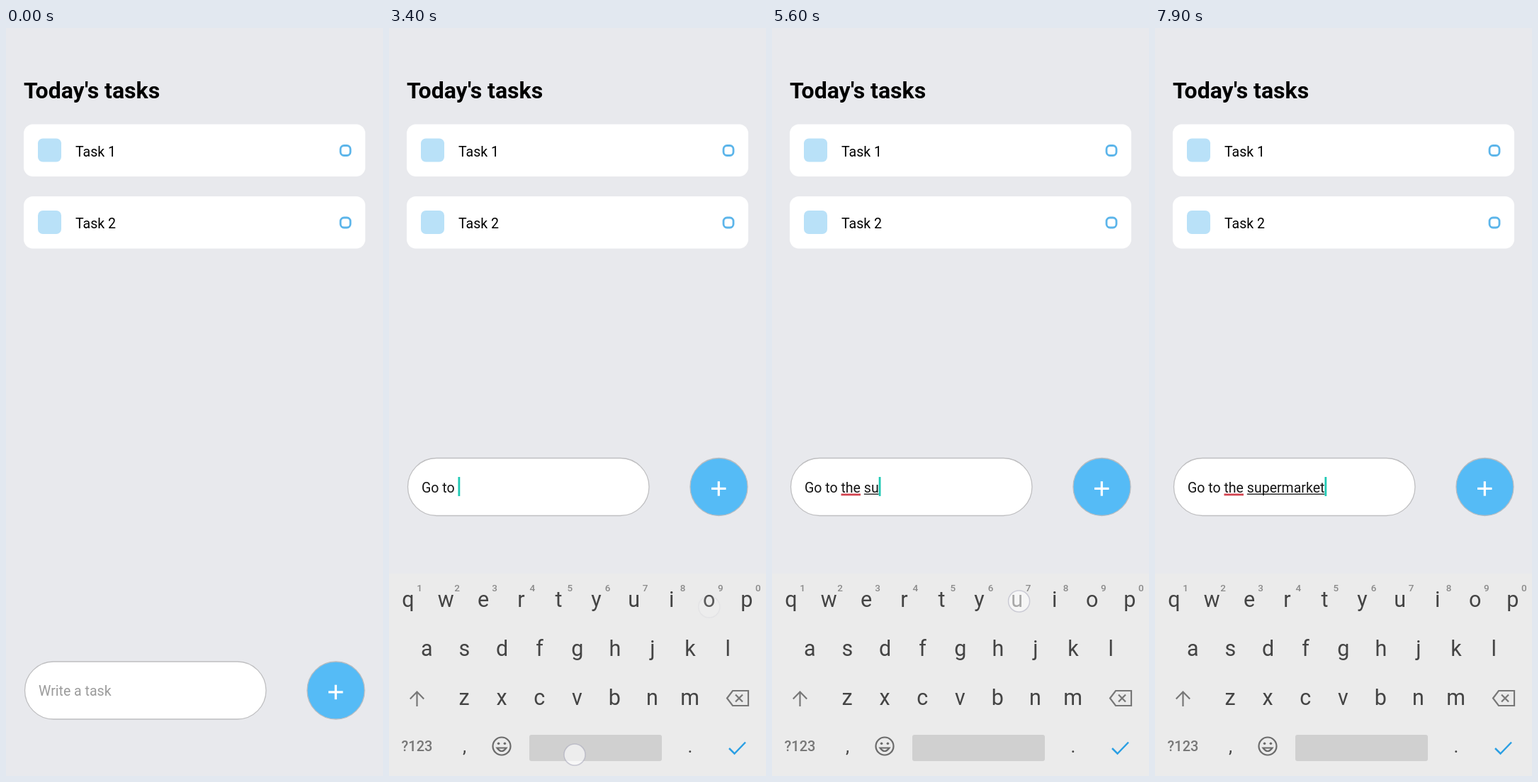
Recreate the animation shown at these times as an HTML page with a canvas. Size 532 by 1053 pixels, loop 8 s.

```html
<!DOCTYPE html>
<html lang="en">
<head>
<meta charset="utf-8">
<title>Today's tasks</title>
<style>
  html, body { margin: 0; width: 100%; height: 100%; overflow: hidden; background: #e8e9ed; }
  canvas { display: block; }
</style>
</head>
<body>
<canvas id="stage" width="532" height="1053"></canvas>
<script>
const ctx = document.getElementById('stage').getContext('2d');
const LOOP = 8000, FOCUS = 1300, HOLD = 100, FADE = 280;
const BLUE = '#55bbf6', ROWS = ['qwertyuiop', 'asdfghjkl', 'zxcvbnm'];
const TEXT_SIZE = 19.55, TEXT_X = 46;

// Key, press time, finger offset from the key's anchor
const taps = [
  ['G', 2200, -7, 9], ['o', 2410, 8, -5], [' ', 2620, -38, 13],
  ['t', 2880], ['o', 3070], [' ', 3260, -30, 13],
  ['t', 4350, -3, 26], ['h', 4560], ['e', 4750], [' ', 4950, -30, 5],
  ['s', 5180], ['u', 5430, 3, 2],
  ['p', 5820], ['e', 6060], ['r', 6300], ['m', 6560, 5, 16],
  ['a', 6800], ['r', 6980], ['k', 7140], ['e', 7300], ['t', 7460]
].map(([char, time, dx = 0, dy = 10]) => ({ char, time, dx, dy }));

function keyAt(char) {
  if (char === ' ') return { x: 292, base: 1020, row: 3 };
  const row = ROWS.findIndex(r => r.includes(char.toLowerCase()));
  const col = ROWS[row].indexOf(char.toLowerCase());
  return { x: [27, 53.3, 106][row] + col * 53.1, base: [815, 884, 953][row], row };
}

function text(str, x, y, size, color, weight = 400, align = 'left') {
  ctx.font = `${weight} ${size}px Roboto, sans-serif`;
  ctx.fillStyle = color;
  ctx.textAlign = align;
  ctx.fillText(str, x, y);
}

function widthOf(str) {
  ctx.font = `400 ${TEXT_SIZE}px Roboto, sans-serif`;
  return ctx.measureText(str).width;
}

function rect(x, y, w, h, color) {
  ctx.fillStyle = color;
  ctx.fillRect(x, y, w, h);
}

function rounded(x, y, w, h, r, fill, stroke, line = 1.3) {
  ctx.beginPath();
  ctx.roundRect(x, y, w, h, r);
  if (fill) { ctx.fillStyle = fill; ctx.fill(); }
  if (stroke) { ctx.strokeStyle = stroke; ctx.lineWidth = line; ctx.stroke(); }
}

function icon(path, color, line = 2.2) {
  ctx.strokeStyle = color;
  ctx.lineWidth = line;
  ctx.stroke(new Path2D(path));
}

function drawTasks() {
  text("Today's tasks", 25, 99, 32, '#000', 700);
  [135.5, 237].forEach((y, i) => {
    rounded(25, y, 482, 73.5, 13, '#fff');
    rounded(45, y + 20, 33, 33, 7, '#b9e1f8');
    text(`Task ${i + 1}`, 98, y + 45.3, TEXT_SIZE, '#000');
    rounded(472, y + 30, 14, 14, 5, null, '#5cb5ea', 2.8);
  });
}

function drawInput(t, typed, lastEdit) {
  const focused = t >= FOCUS, y = focused ? 605.5 : 892;
  rounded(26.5, y, 340.5, 81, 40.5, '#fff', '#bfbfc1');
  rounded(425, y, 81, 81, 40.5, BLUE, '#b5bcc2');
  rect(455, y + 41.3, 20.5, 3.2, '#fff');
  rect(463.7, y + 32.7, 3.2, 20.5, '#fff');

  text(typed || 'Write a task', TEXT_X, y + 48, TEXT_SIZE, typed ? '#151515' : '#9b9b9b');
  if (!focused) return;

  const wordStart = typed.lastIndexOf(' ') + 1;
  const underline = (from, to, color, line) => {
    const x = TEXT_X + widthOf(typed.slice(0, from));
    rect(x, y + 50, widthOf(typed.slice(from, to)), line, color);
  };
  if (wordStart < typed.length) underline(wordStart, typed.length, '#222', 1.4);
  if (typed.startsWith('Go to the ')) underline(6, 9, '#d2434f', 2.8);
  if ((t - lastEdit) % 1000 < 500) rect(TEXT_X + widthOf(typed), y + 26.5, 2.8, 27, '#1fc9b4');
}

function drawKeyboard(t, upper) {
  const left = Math.max(0, 1 - (t - FOCUS) / 370);
  rect(0, 768, 532, 285, '#fff');
  ctx.save();
  ctx.translate(0, 284 * left ** 3);
  rect(0, 768, 532, 285, '#ebebeb');
  ROWS.forEach((row, r) => [...row].forEach((char, i) => {
    const { x, base } = keyAt(char);
    text(upper ? char.toUpperCase() : char, x, base, 30.5, '#444', 400, 'center');
    if (r === 0) text((i + 1) % 10, x + 16, 793, 13.5, '#8a8a8a', 500, 'center');
  }));
  icon('M39.5 955V934.5M29.8 944.5L39.5 934.5L49.2 944.5', upper ? '#2b9fe3' : '#777');
  icon('M477 943.5L485 933H507V954H485ZM489 938.5L499 948.5M499 938.5L489 948.5', '#777');
  text('?123', 39.5, 1018, 20, '#777', 500, 'center');
  text(',', 106.5, 1020, 26, '#444', 400, 'center');
  text('.', 425, 1020, 26, '#444', 400, 'center');
  icon('M171.5 1011a12.5 12.5 0 1 0-25 0a12.5 12.5 0 1 0 25 0M152.5 1013.5q6.5 9 13 0z', '#6b6b6b');
  rounded(152.8, 1005.5, 3.6, 3.6, 1.8, '#6b6b6b');
  rounded(161.6, 1005.5, 3.6, 3.6, 1.8, '#6b6b6b');
  rounded(198, 995, 187, 37, 3, '#d0d0d0');
  icon('M480 1014L487.5 1021.5L503 1005.5', '#2b9fe3', 2.5);
  ctx.restore();
}

function drawPopup(char) {
  const { x, base, row } = keyAt(char);
  if (row === 3) return;
  ctx.save();
  ctx.shadowColor = 'rgba(0,0,0,.28)';
  ctx.shadowBlur = 7;
  ctx.shadowOffsetY = 2;
  rounded(x - 26, base - 134, 52, 153, 3, '#fff');
  ctx.restore();
  text(char, x, base - 82, 37, '#3c3c3c', 400, 'center');
  if (row === 0) [8, 12.5, 17].forEach(dx => rect(x + dx - 0.8, base - 67.5, 2.3, 2.3, '#555'));
}

function drawTouch(x, y, age) {
  if (age < 0 || age > HOLD + FADE) return;
  ctx.globalAlpha = Math.min(1, 1 - (age - HOLD) / FADE);
  rounded(x - 15, y - 15, 30, 30, 15, 'rgba(255,255,255,.72)', 'rgba(165,165,185,.65)', 1.5);
  ctx.globalAlpha = 1;
}

function frame(now) {
  const t = now % LOOP;
  const done = taps.filter(tap => t >= tap.time + HOLD);
  const typed = done.map(tap => tap.char).join('');
  const lastEdit = done.length ? done[done.length - 1].time + HOLD : FOCUS;
  const pressed = taps.find(tap => t >= tap.time && t < tap.time + HOLD);

  rect(0, 0, 532, 1053, '#e8e9ed');
  drawTasks();
  drawInput(t, typed, lastEdit);
  if (t >= FOCUS) drawKeyboard(t, !typed);
  if (pressed) drawPopup(pressed.char);
  drawTouch(190, 935, t - 1120);
  for (const { char, time, dx, dy } of taps) {
    const { x, base } = keyAt(char);
    drawTouch(x + dx, base - 10 + dy, t - time);
  }
  requestAnimationFrame(frame);
}
requestAnimationFrame(frame);
</script>
</body>
</html>
```
